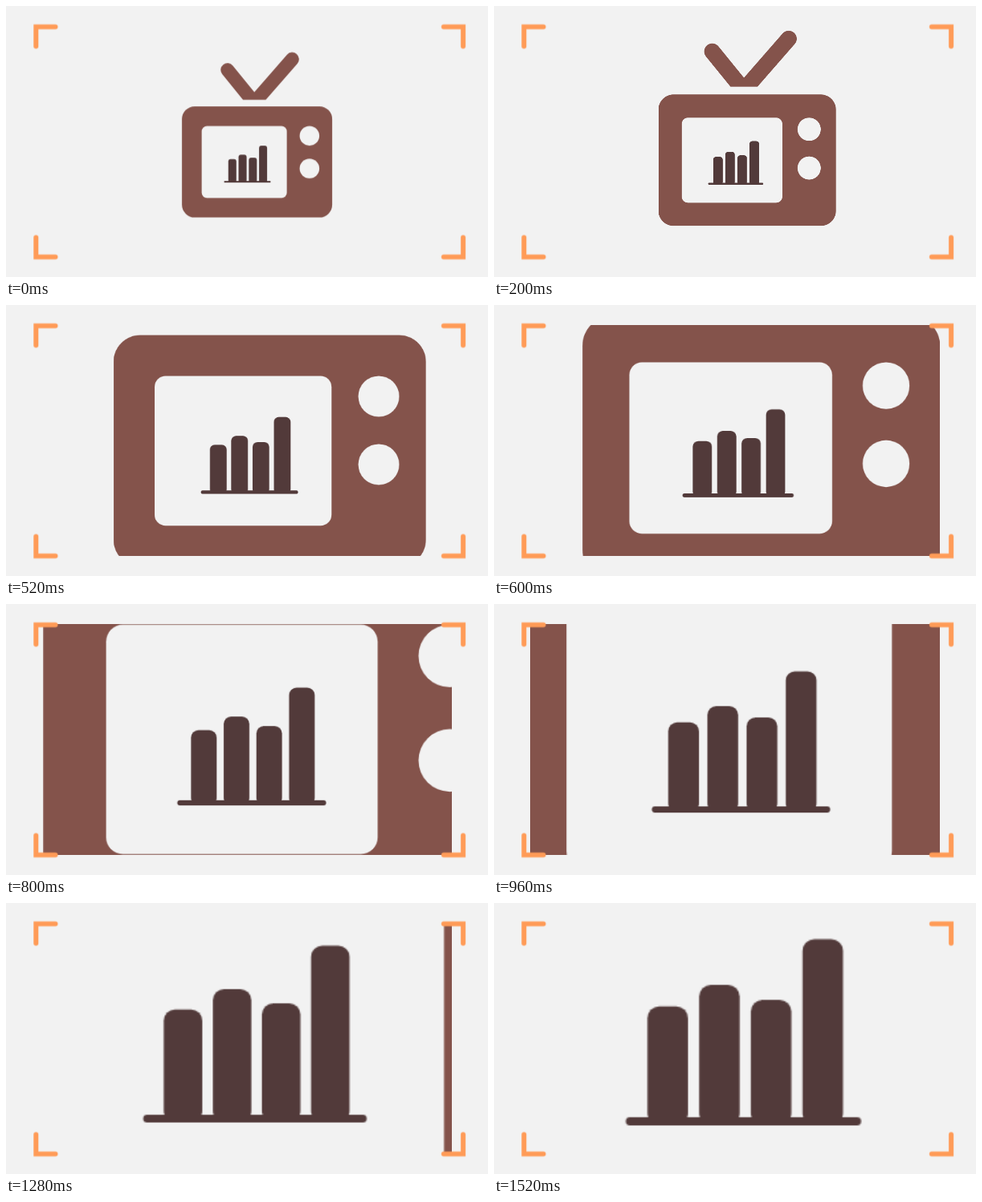
Animation of 600x338 px, one loop 2000 ms. Source, as an HTML page:

```html
<!DOCTYPE html>
<html lang="en">
<head>
<meta charset="utf-8">
<title>Zoom into the chart</title>
<style>
  html, body { margin: 0; width: 100%; height: 100%; overflow: hidden; background: #f2f2f2; }
  svg { display: block; width: 100%; height: 100%; }
  .tv { fill: #84534b; }
  .antenna { fill: none; stroke: #84534b; stroke-width: 17; stroke-linecap: round; }
  .hole { fill: #f2f2f2; }
  .chart { fill: #523a3a; }
  .bracket { fill: none; stroke: #ff9b57; stroke-width: 6; stroke-linecap: round; }
  .zoom { transform-origin: 0 0; animation: zoom 2s infinite; }
  @keyframes zoom {
    0% { transform: scale(1); animation-timing-function: cubic-bezier(.35, 0, .65, 1); }
    76%, 100% { transform: scale(5.043); }
  }
</style>
</head>
<body>
<svg viewBox="0 0 600 338">
  <defs>
    <clipPath id="view"><rect x="45" y="25.2" width="510" height="287.4"/></clipPath>
    <clipPath id="base"><rect x="-60" y="-160" width="140" height="70.7"/></clipPath>
    <path id="corner" class="bracket" d="M-265.9-119.2V-143.5H-241.7"/>
  </defs>

  <g clip-path="url(#view)">
    <!-- the zoom centre is the local origin -->
    <g transform="translate(297.9 206.2)">
      <g class="zoom">
        <g clip-path="url(#base)">
          <path class="antenna" d="M-22.2-126.5L15.5-80M58.3-139.9L6.1-80"/>
        </g>
        <rect class="tv" x="-78.9" y="-81.1" width="187" height="138.7" rx="16"/>
        <g class="hole">
          <rect x="-54.35" y="-56.55" width="106" height="89.75" rx="6.6"/>
          <circle cx="79.85" cy="-44.35" r="12.25"/>
          <circle cx="79.85" cy="-3.5" r="12.25"/>
        </g>
        <g class="chart">
          <rect x="-21.2" y="-15.3" width="10" height="29.3" rx="2.9"/>
          <rect x="-8.44" y="-20.66" width="10" height="34.66" rx="2.9"/>
          <rect x="4.32" y="-16.95" width="10" height="30.95" rx="2.9"/>
          <rect x="17.08" y="-31.96" width="10" height="45.96" rx="2.9"/>
          <rect x="-26.55" y="12.12" width="58.1" height="1.98" rx=".99"/>
        </g>
      </g>
    </g>
  </g>

  <g transform="translate(303.2 169.5)">
    <use href="#corner"/>
    <use href="#corner" transform="scale(-1 1)"/>
    <use href="#corner" transform="scale(1 -1)"/>
    <use href="#corner" transform="scale(-1 -1)"/>
  </g>
</svg>
</body>
</html>
```
